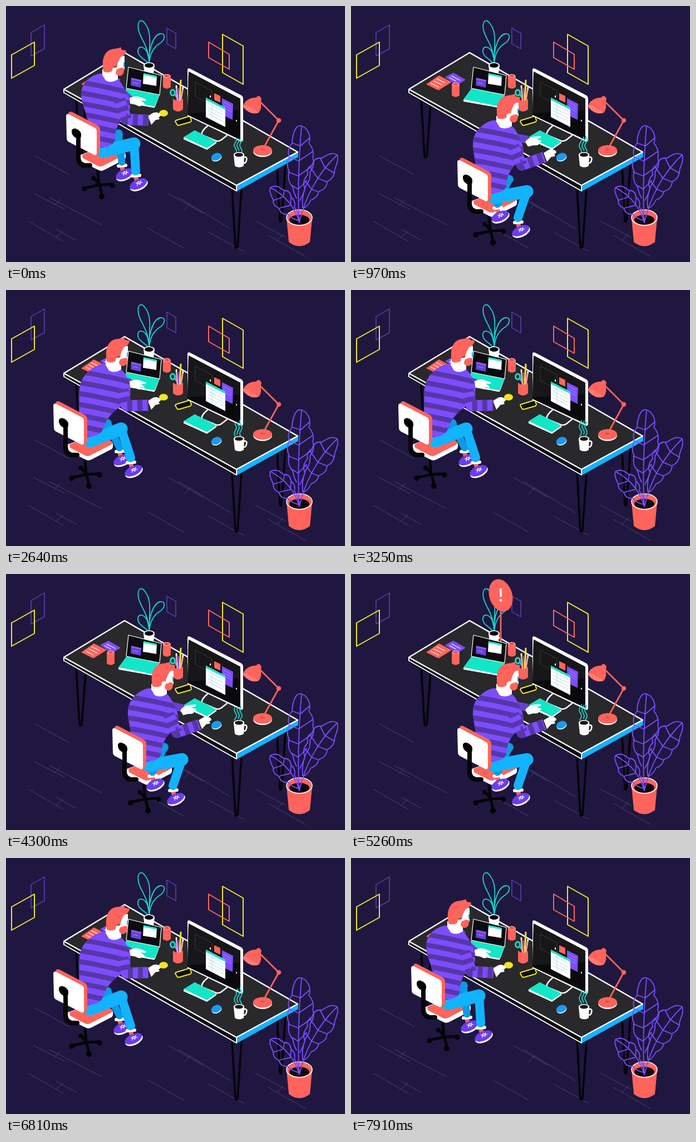
Recreate the animation shown at these times as an HTML page. Size 609 by 461 pixels, loop 7.98 s.

```html
<!DOCTYPE html>
<html lang="en">
<head>
<meta charset="utf-8">
<title>Two screens, one desk</title>
<style>
html,body{margin:0;width:100%;height:100%;overflow:hidden;background:#1f1740}
svg{display:block;width:100%;height:100%}
.line{fill:none;stroke-width:2;stroke-linecap:round;stroke-linejoin:round}
.red{fill:#ff645c}.teal{fill:#12e6c8}.violet{fill:#7c4dff}.white{fill:#fff}.blue{fill:#12b3ff}.yellow{fill:#f5e51b}
.sRed{stroke:#ff645c}.sTeal{stroke:#12d8d0}.sViolet{stroke:#7c4dff}.sDim{stroke:#50359a}.sYellow{stroke:#f2ea1c}.sWhite{stroke:#fff}.sBlack{stroke:#050407}
</style>
</head>
<body>
<svg viewBox="0 0 609 461">
<defs>
  <g id="base">
    <path class="line sBlack" style="stroke-width:5" d="M164 288L167 322M168 322L141 328M168 322L172 341M168 322L191 321M167 320L157 309"/>
    <circle cx="141" cy="329" r="4.5"/><circle cx="172" cy="343" r="5"/><circle cx="191" cy="323" r="4.5"/><circle cx="157" cy="310" r="4"/>
    <path class="white" d="M134 268L182 250L211 262Q216 265 215 272Q215 276 210 278L175 296Q170 298 165 295L138 281Q133 278 134 268Z"/>
    <path class="red" d="M137 268L182 249L211 261Q217 265 211 269L174 288Q169 290 165 288L138 274Z"/>
  </g>
  <g id="rest">
    <path class="red" d="M112 193Q114 189 119 191L163 214Q169 217 169 223V262Q168 268 162 267L114 240Z"/>
    <path class="white" d="M108 199Q108 193 113 195L159 219Q163 221 163 226V265Q162 270 158 268L113 245Q109 243 109 238Z"/>
    <path class="line sBlack" style="stroke-width:8" d="M130 238V273Q130 284 139 287L151 287"/>
    <path d="M118 224Q121 218 128 222Q136 226 135 234Q134 241 128 239Q117 234 118 224Z"/>
  </g>
  <g id="head">
    <path class="white" d="M-22 14L4 10L8 -12L18 -10V14L6 24V32Q-6 40 -16 34L-22 24Z"/>
    <path class="red" d="M-20 18Q-23 0 -19 -9Q-14 -22 0 -23Q8 -24 11 -26L13 -21L21 -20Q20 -11 11 -8Q5 2 4 9Q-4 7 -4 17Q-12 22 -20 18Z"/>
    <path class="red" d="M4 14L12 11L17 12Q18 24 10 26Q2 25 2 19Z"/>
    <path class="line" stroke="#12b3ff" d="M17 2V9"/>
  </g>
  <g id="shoe">
    <path class="line sRed" style="stroke-width:8" d="M0 0L2 9"/>
    <g transform="translate(5 15) rotate(-25)">
      <ellipse class="white" cy="2" rx="17" ry="9"/><ellipse cy="-.5" rx="16.5" ry="8.5" fill="#6b3df0"/>
      <path class="line sWhite" style="stroke-width:1.3" d="M-3 -4L3 1M1 -5L7 0M-3 1L1 -4M2 1L6 -4"/>
    </g>
    <path class="line sWhite" style="stroke-width:6" d="M-6 0L7 -1"/>
  </g>
  <g id="can"><path class="red" d="M-7 -10V10Q0 16 7 10V-10Z"/><ellipse cy="-10" rx="6.5" ry="3.6" fill="#ff9189"/><ellipse cy="-10" rx="4" ry="2" fill="#e04d4b"/></g>
</defs>

<g class="line">
  <path stroke="#4b456a" style="stroke-width:1" d="M52 270L114 304M49 337L105 366M78 345L172 394M87 359L98 348M41 388L103 424M90 402L126 422M91 416L102 405M292 338L354 373M310 345L403 401M319 368L330 356M255 400L319 436M364 407L427 442M448 387L503 417M471 413L538 451M487 422L498 411"/>
  <path class="sDim" d="M45 48L69 34V77L45 90ZM289 40L305 49V77L289 68Z"/>
  <path class="sYellow" d="M10 88L51 65V107L10 130ZM389 51L426 72V141L389 120Z"/>
  <path class="sRed" d="M364 65L401 87V114L364 93Z"/>
  <path class="sBlack" style="stroke-width:3.6" d="M126 166L132 271Q134 275 136 271L143 178M487 290L492 386Q493 391 495 386L502 286M406 328L412 433Q414 438 416 433L423 330"/>
</g>

<path d="M104 150L414 324V334L104 158Z" fill="#0d0c10"/>
<path class="blue" d="M414 324L525 262V272L414 334Z"/>
<path class="line sWhite" d="M213 84L104 150L414 323L524 263Z" style="fill:#29282a;stroke-width:2.4"/>
<path class="line sWhite" d="M104 150V156L414 333V324"/>

<path class="red" d="M135 141L158 125L181 137L157 152Z"/>
<path class="violet" d="M169 128L184 120L206 133L190 143Z"/>
<path class="line sWhite" style="stroke-width:1.2" d="M154 131L168 138M149 135L163 142M144 139L157 146M181 126L196 134M177 129L188 135"/>
<use href="#can" x="188" y="151"/><use href="#can" x="289" y="136"/>

<g class="line sTeal" style="stroke-width:1.8">
  <path d="M257 105C256 80 264 50 250 32C243 21 235 27 238 43C241 58 255 70 257 100M257 105C256 78 264 53 277 50C288 48 286 62 275 68C263 76 258 90 257 105M257 105C250 95 235 91 237 79C239 69 251 75 254 85C257 93 257 99 257 105"/>
</g>
<path class="white" d="M247 107L249 122Q257 128 265 122L267 107Z"/><ellipse class="white" cx="257" cy="107" rx="10" ry="5.5"/><ellipse cx="257" cy="107" rx="8" ry="4"/>

<g id="alert">
  <path class="line sRed" style="stroke-width:2.4" d="M269 72V122"/>
  <ellipse class="red" cx="269" cy="49" rx="18" ry="26" transform="rotate(-17 269 49)"/>
  <text class="white" x="269" y="59" font-size="29" font-weight="700" text-anchor="middle" font-family="Lato,sans-serif">!</text>
</g>

<path class="white" d="M202 169L217 148L276 160L268 181Q267 184 264 183L202 172Z"/>
<path class="teal" d="M202 168L217 148L276 159L267 181Z"/>
<path class="line sWhite" style="stroke-width:1.2;fill:#0c0b0f" d="M220 110L279 125L276 160L216 148Z"/>
<path fill="#6a42df" d="M225 129L243 133L242 147L224 143Z"/><path class="line" stroke="#a78bff" style="stroke-width:1" d="M225 131L243 135M229 138L237 140"/>
<path class="white" d="M247 121L271 126L270 144L246 140Z"/><path class="teal" d="M247 121L271 126V129L247 124Z"/>

<g class="line">
  <path class="sTeal" style="stroke-width:3" d="M299 151A4 5 0 1 0 300 161A4 5 0 1 0 299 151M304 160L310 169"/>
  <path class="sYellow" style="stroke-width:3" d="M314 134L312 170"/>
  <path stroke="#ff9db0" style="stroke-width:3" d="M306 144L308 170M318 146L314 170"/><path class="sWhite" d="M306 144V147M318 146V149"/>
  <path class="sViolet" d="M310 149V168"/>
</g>
<path class="red" d="M300 167V186Q309 194 318 186V167Q309 174 300 167Z"/>
<ellipse class="yellow" cx="283" cy="193" rx="8" ry="6"/>
<path class="line sYellow" style="fill:#0d0c10" d="M305 206L328 199Q330 198 331 200L333 206Q333 208 331 209L310 215Q308 215 307 213L304 208Z"/>

<path class="line sWhite" style="stroke-width:2.4" d="M362 216Q350 226 352 232L378 243Q383 244 387 241L397 233"/>
<path class="white" d="M326 114Q327 111 331 113L423 161Q426 163 426 166V242Q425 246 421 244L326 198Z"/>
<path d="M328 118L421 167V241L326 196Z" fill="#0a0a0c"/>
<path d="M328 118L421 167V188L326 193Z" fill="#171618"/>
<path class="line" stroke="#4e4b38" style="stroke-width:1" stroke-dasharray="2 2" d="M340 137L370 153V179L340 163Z"/>
<path class="red" d="M374 157L385 162V174L374 169Z"/>
<path class="violet" d="M388 166L408 176L407 205L388 196Z"/>
<path class="line" stroke="#a78bff" style="stroke-width:1" d="M391 173L404 180M391 178L404 185M391 183L404 190"/>
<path class="white" d="M359 165L394 183V218L359 200Z"/><path class="teal" d="M359 165L394 183V187L359 169Z"/>
<path class="line" stroke="#b4dcec" style="stroke-width:1" d="M363 176L390 190M363 182L390 196M363 188L390 202M363 194L390 208M370 175V204"/>
<path class="line sWhite" d="M367 162V164M414 206V207"/>
<path class="white" d="M319 237L339 224L378 244V247L361 259L319 240Z"/><path class="teal" d="M319 236L339 224L378 244L361 256Z"/>
<ellipse class="white" cx="378" cy="273" rx="9.5" ry="6.5" transform="rotate(-22 378 272)"/><ellipse cx="378" cy="271.5" rx="9.5" ry="6.5" fill="#159cf5" transform="rotate(-22 378 272)"/>

<path class="line sWhite" d="M427 272Q434 271 432 278Q431 283 427 283" style="stroke-width:2.6"/>
<path class="white" d="M409 268L411 288Q419 293 427 288L428 268Z"/><ellipse class="white" cx="418.5" cy="268" rx="9.7" ry="5"/><ellipse cx="418.5" cy="268" rx="7.5" ry="3.5" fill="#251210"/>
<path id="steam" class="line sTeal" style="stroke-width:1.8"/>

<ellipse class="white" cx="461" cy="262" rx="17" ry="10"/><ellipse class="red" cx="461" cy="260" rx="17" ry="9.5"/>
<ellipse cx="461" cy="258" rx="4" ry="2" fill="#d94c48"/>
<path class="line sRed" style="stroke-width:2.8" d="M462 257L490 206L454 170"/><circle class="red" cx="490" cy="206" r="4.2"/>
<path class="red" d="M426 180C428 171 439 164 449 165Q454 159 458 165Q460 168 457 173Q461 184 454 192Q445 195 436 188Z"/>
<path d="M426 180Q431 177 440 184Q451 189 454 192Q444 196 435 190Q427 185 426 180Z" fill="#ff7b70"/>

<g id="man"></g>

<path class="red" d="M504 382L508 425Q527 440 546 425L550 382Z"/>
<ellipse class="red" cx="527" cy="382" rx="23" ry="14"/><ellipse cx="527" cy="385" rx="18" ry="9" fill="#0d0910"/>
<path class="line sWhite" style="stroke-width:1.6" d="M504 381A23 14 0 0 1 550 381A23 14 0 0 1 504 381"/>
<g class="line sViolet" style="stroke-width:1.8">
  <path d="M527 390C523 340 527 260 531 216C519 212 514 236 514 247Q504 259 509 272Q502 286 509 298Q504 313 515 326Q518 340 522 346M531 216C543 220 549 236 544 247Q555 260 551 273Q556 287 546 299Q548 313 538 325Q535 338 528 350M509 272L526 279L551 262M507 299L525 306L549 289M512 322L525 330L540 314M514 247L529 252L545 238"/>
  <path d="M527 390C537 345 561 300 595 268C583 261 574 271 567 274Q554 272 550 286Q539 291 542 304Q531 315 537 329Q531 345 533 363M595 268C599 280 590 290 590 299Q588 312 577 316Q576 330 562 334Q559 346 548 349Q543 360 535 364M565 275L573 291L590 301M547 291L560 310L577 317M538 315L549 330L562 335"/>
  <path d="M527 390C520 365 504 342 475 327C472 334 477 342 480 349Q479 360 490 364Q493 376 506 375Q514 384 525 386M475 327C485 321 492 327 499 332Q511 332 512 344Q521 351 518 362Q526 371 526 383M480 350L498 344L500 332M491 364L511 359L512 345"/>
</g>
</svg>

<script>
const LOOP = 7980;
const $ = id => document.getElementById(id);
const mix = (a, b, k) => a + (b - a) * k;

// chair shift, head, back bulge, wrist, elbow drop, far hand + angle, knee, ankle, far knee, far ankle
const work  = [0,0, 195,100, 0, 256,206,-2, 238,171,0, 230,248, 233,306, 202,230, 208,288];
const typing = [83,83, 283,184, 12, 347,272,14, 330,244,-25, 316,334, 300,390, 284,312, 263,364];
const glide = [-6,17, 198,118, 6, 263,214,2, 244,184,-22, 228,278, 240,336, 198,246, 195,306];
const land  = [-13,12, 200,116, 6, 257,208,5, 238,171,0, 219,262, 222,320, 188,245, 187,299];
const away  = [-23,10, 201,111, 6, 256,207,1, 238,171,0, 207,250, 224,311, 182,240, 204,291];

const moves = [[0,work],[100,work],[800,typing],[1700,typing],[2080,glide],[2210,land],[2550,away],[3400,away],
  [4150,typing],[5430,typing],[5820,glide],[5960,land],[6350,away],[6800,away],[7420,work],[LOOP,work]];
const pops = [1250, 5060].flatMap(t => [[t,[0]],[t+220,[1.17]],[t+380,[1]],[t+1150,[1]],[t+1350,[0]]]);
const alerts = [[0,[0]], ...pops, [LOOP,[0]]];

function track(keys, t) {
  const i = keys.findIndex(k => k[0] > t), [t0, a] = keys[i - 1], [t1, b] = keys[i];
  let k = (t - t0) / (t1 - t0);
  k = a === glide ? k : a === land ? 1 - (1 - k) ** 2 : k * k * (3 - 2 * k);
  return a.map((v, n) => mix(v, b[n], k));
}

// x, y, and how far the point follows the chair instead of the head
const shirt = [[173,119,0],[150,128,0],[136,145,.1],[134,165,.25],[143,192,.5],[153,225,.8],[164,256,1],[182,254,1],
  [196,246,1],[196,226,.8],[206,204,.5],[224,190,.3],[222,168,.1],[212,146,0],[201,130,0]];

function smooth(pts) {
  const mid = (a, b) => [(a[0] + b[0]) / 2, (a[1] + b[1]) / 2];
  return 'M' + mid(pts.at(-1), pts[0]) +
    pts.map((p, i) => 'Q' + p + ' ' + mid(p, pts[(i + 1) % pts.length])).join('') + 'Z';
}

const limb = (pts, width, color, extra = '') =>
  `<path class="line" d="M${pts.join('L')}" style="stroke:${color};stroke-width:${width};${extra}"/>`;
const use = (id, x, y) => `<use href="#${id}" x="${x}" y="${y}"/>`;

function drawMan(t) {
  const [cx, cy, hx, hy, bulge, wx, wy0, drop, fx, fy0, turn, kx, ky, ax, ay, gx, gy, bx, by] = track(moves, t);
  const wy = wy0 + Math.sin(t / 50) * .7, fy = fy0 + Math.cos(t / 45) * .8;
  const dx = w => mix(hx - 195, cx, w), dy = w => mix(hy - 100, cy, w);
  const body = smooth(shirt.map(([x, y, w], i) => [x + dx(w) - (i < 7 ? bulge * w : 0), y + dy(w)]));
  const hip = [cx + 174, cy + 262], arm = [[hx + 9, hy + 68], [wx - 40, wy + drop], [wx, wy]];
  let stripes = '';
  for (let k = 0; k < 7; k++) {
    const w = k / 6, x = 175 + dx(w), y = 146 + 19 * k + dy(w);
    stripes += `M${x - 65} ${y - 12}Q${x - 10} ${y - 5} ${x + 55} ${y + 12}`;
  }
  $('man').innerHTML =
    use('base', cx, cy) +
    use('shoe', bx, by) + limb([hip, [gx, gy]], 16, '#0d8fd2') + limb([[gx, gy], [bx, by - 7]], 13, '#0d9be3') +
    use('shoe', ax, ay) + limb([hip, [kx, ky]], 23, '#12b3ff') + limb([[kx, ky], [ax, ay - 9]], 16, '#12b3ff') +
    limb([[hx + 10, hy + 52], [fx - 15, fy - 3]], 14, '#6541d0') +
    `<path class="white" transform="translate(${fx} ${fy}) rotate(${turn})" d="M-16 -6Q-7 -11 2 -8L13 -4Q15 -1 10 -1L4 -2L11 4Q11 7 6 5L3 4L5 8Q1 10 -5 6L-15 4Z"/>
    <clipPath id="cut"><path d="${body}"/></clipPath>
    <path class="violet" d="${body}"/>
    <path class="line" clip-path="url(#cut)" d="${stripes}" style="stroke:#5736a9;stroke-width:9"/>
    <path class="white" transform="translate(${wx} ${wy})" d="M-1 -8L9 -14Q18 -16 22 -10Q22 -7 18 -6L20 -3Q18 -1 13 -1L5 8Z"/>` +
    limb(arm, 20, '#7c4dff', 'stroke-linecap:butt') +
    limb(arm, 20, '#5736a9', 'stroke-linecap:butt;stroke-dasharray:9 9;stroke-dashoffset:4') +
    use('head', hx, hy) + use('rest', cx, cy);
}

function drawSteam(t) {
  let d = '';
  [412, 417, 422].forEach((x, n) => {
    const top = 237 + 3 * Math.sin(t * Math.PI * 8 / LOOP + n);
    for (let y = 263 - n % 2 * 3; y >= top; y -= 2)
      d += (d && y < 260 - n % 2 * 3 + 2 ? 'L' : 'M') + (x + 2 * Math.sin(y / 3.4 + t * Math.PI * 16 / LOOP)) + ' ' + y;
  });
  $('steam').setAttribute('d', d);
}

function frame(now) {
  const t = now % LOOP, [s] = track(alerts, t);
  $('alert').setAttribute('transform', `translate(269 122) scale(${s}) translate(-269 -122)`);
  drawMan(t);
  drawSteam(t);
  requestAnimationFrame(frame);
}
frame(0);
</script>
</body>
</html>
```
